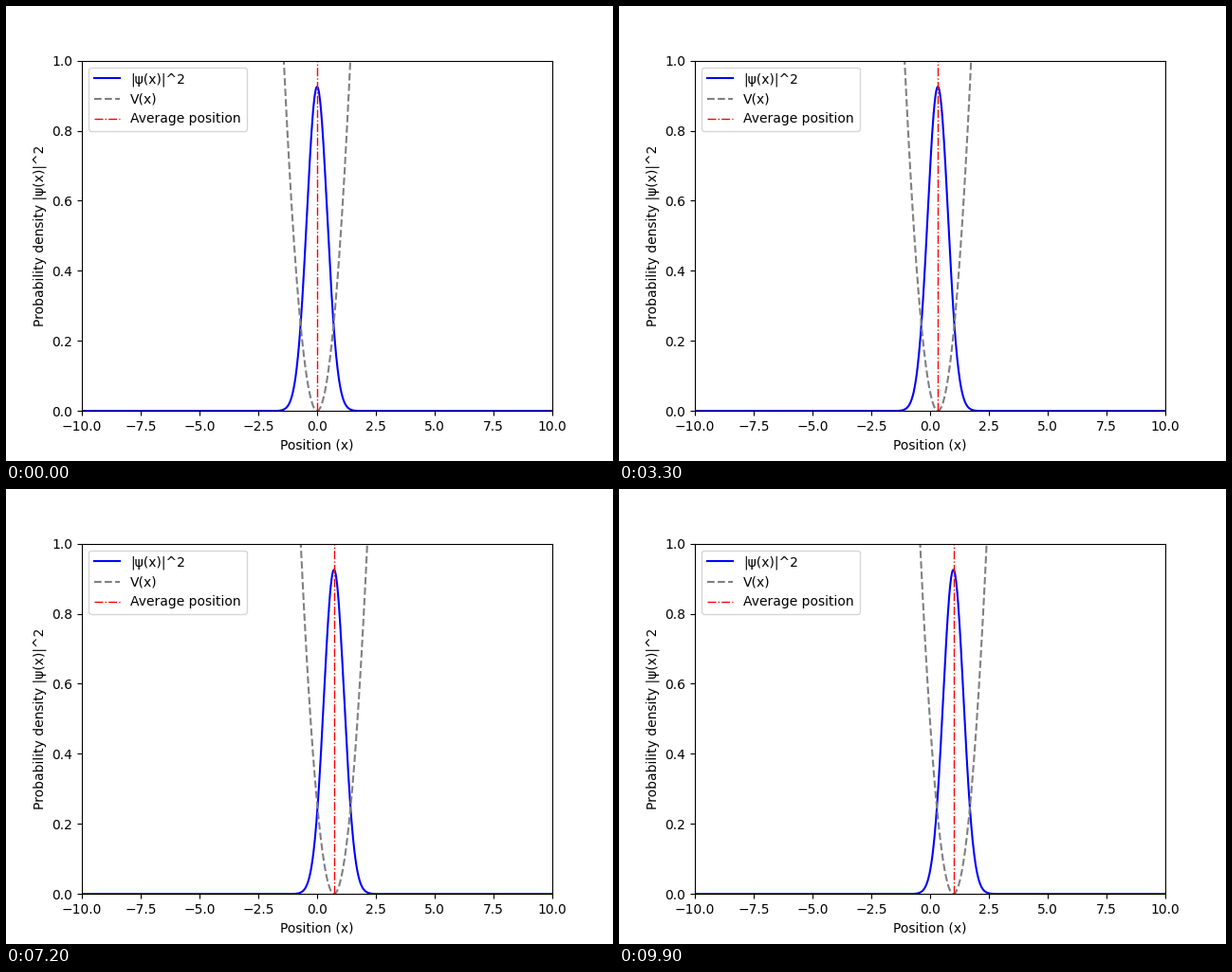
A matplotlib script that plays this animation: 640x480 px, repeating every 10000 ms.

```python
import numpy as np
import matplotlib.pyplot as plt
from matplotlib.animation import FuncAnimation

FRAMES = 100
INTERVAL = 100   # ms per frame
STEP = 0.01      # drift of the well per frame
ALPHA = 2.69     # inverse squared width of the ground state

x = np.linspace(-10, 10, 1000)


def density(center):
    return np.sqrt(ALPHA / np.pi) * np.exp(-ALPHA * (x - center) ** 2)


def potential(center):
    return 0.5 * (x - center) ** 2


fig, ax = plt.subplots(figsize=(6.4, 4.8), dpi=100)
ax.set_xlim(-10, 10)
ax.set_ylim(0, 1)
ax.set_xlabel("Position (x)")
ax.set_ylabel("Probability density |ψ(x)|^2")

psi_line, = ax.plot(x, density(0), color="blue", label="|ψ(x)|^2")
v_line, = ax.plot(x, potential(0), color="gray", linestyle="--", label="V(x)")
mean_line = ax.axvline(0, color="red", linestyle="-.", linewidth=1,
                       label="Average position")
ax.legend(loc="upper left")


def update(i):
    center = STEP * i
    psi_line.set_ydata(density(center))
    v_line.set_ydata(potential(center))
    mean_line.set_xdata([center, center])
    return psi_line, v_line, mean_line


anim = FuncAnimation(fig, update, frames=FRAMES, interval=INTERVAL,
                     repeat=True, repeat_delay=0)
plt.show()
```
